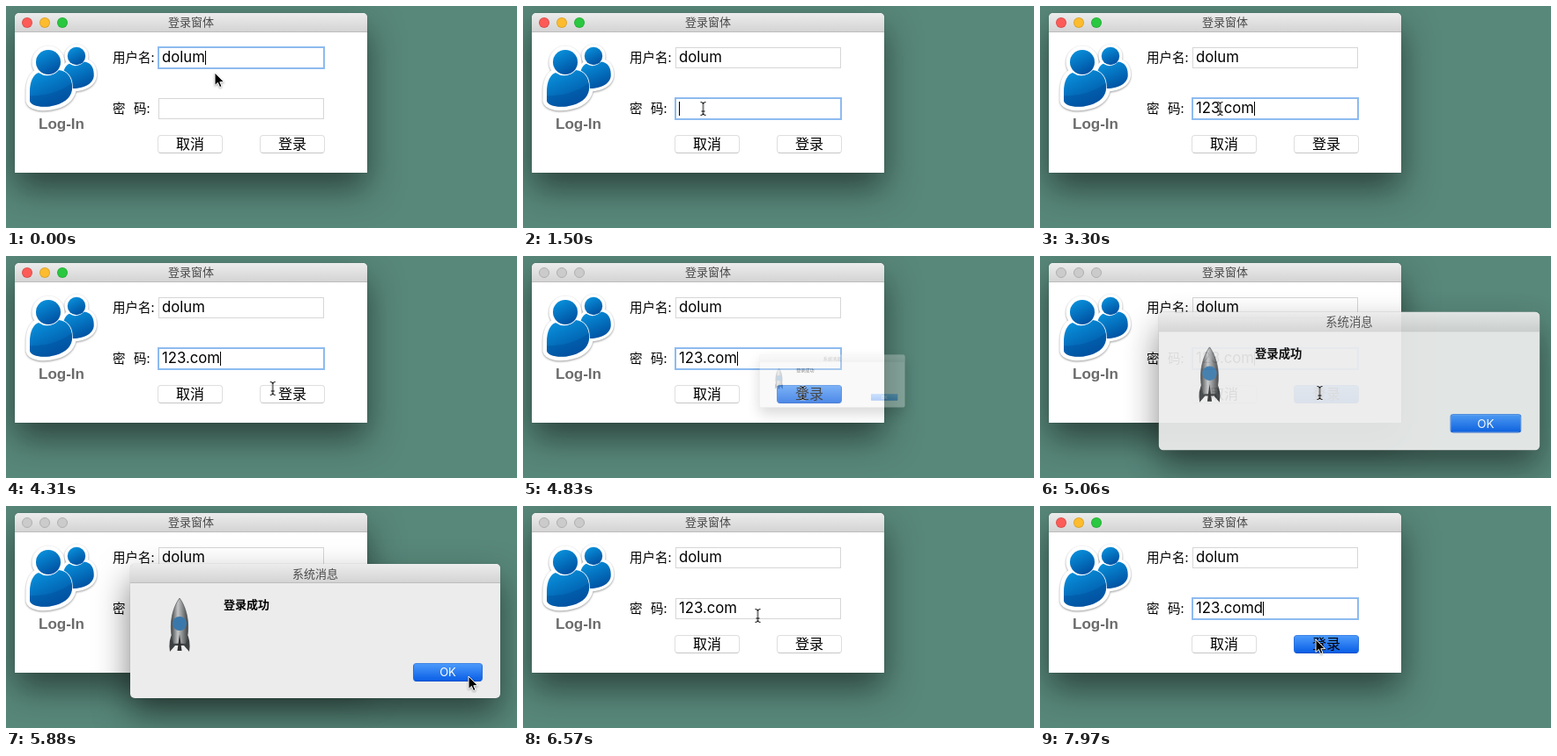
An HTML page that plays this animation: 580 px wide and 253 px high, repeating every 8 s.

```html
<!DOCTYPE html>
<html lang="zh-CN">
<head>
<meta charset="utf-8">
<title>登录窗体</title>
<style>
html, body { margin: 0; width: 100%; height: 100%; overflow: hidden; background: #58887a; }
body { position: relative; font-family: "Noto Sans CJK SC", "Noto Sans CJK", sans-serif; color: #000; }
body * { box-sizing: border-box; }
.at, .window, .bar, .field, .button, svg { position: absolute; }
.at { line-height: 20px; white-space: nowrap; }
svg { left: 0; top: 0; overflow: visible; }

.window { border-radius: 5px 5px 0 0; box-shadow: 0 18px 38px rgba(0, 0, 0, .5), 0 0 1px rgba(0, 0, 0, .35); }
.bar {
  left: 0; top: 0; width: 100%; height: 22px; border-radius: 5px 5px 0 0;
  background: linear-gradient(#ececec, #d4d4d4); border-bottom: 1px solid #bdbdbd;
  font-size: 13px; font-weight: 500; line-height: 20px; text-align: center; color: #4a4a4a;
}
#login { left: 10px; top: 8px; width: 400px; height: 182px; background: #fff; }
.light { position: absolute; top: 5px; width: 12px; height: 12px; border-radius: 50%; border: 1px solid rgba(0, 0, 0, .12); }
.inactive .light { background: #cbcbcb !important; border-color: #b0b0b0; }
.label { font-size: 14.5px; font-weight: 500; }
.caption { font: bold 17px/20px "Liberation Sans", sans-serif; color: #6b6b6b; }

.field {
  left: 163px; width: 188px; height: 24px; padding-left: 3px; border: 1px solid #d6d6d6;
  font: 16.7px/21px Inter, sans-serif; font-feature-settings: "cv11"; white-space: nowrap;
}
.field.focus { border-color: #8cb9ee; box-shadow: 0 0 0 1px #8fbcf0; }
.field i { display: inline-block; width: 1px; height: 16px; vertical-align: -3px; background: #000; visibility: hidden; }
.field.caret i { visibility: visible; }

.button {
  top: 139px; width: 74px; height: 21px; border: 1px solid #dedede; border-bottom-color: #c6c6c6;
  border-radius: 4px; background: #fff; font-size: 16px; line-height: 17px; text-align: center;
}
.button.blue { background: linear-gradient(#4c9afb, #0a5fe6); border-color: #3f86e6 #2a70dc #0a50cc; }

#alert {
  left: 141px; top: 66px; width: 420px; height: 153px; border-radius: 5px; background: #ececec;
  animation: pop 8s linear infinite;
}
#alert .bar { font-weight: 400; line-height: 21px; }
.message { font-size: 13px; font-weight: bold; }
#alert .button { left: 321px; top: 113px; width: 79px; color: #fff; font: 13px/18px Inter, sans-serif; }

#pointer { position: absolute; left: 0; top: 0; animation: move 8s ease-in-out infinite; }
#arrow { filter: drop-shadow(0 1px 1px rgba(0, 0, 0, .35)); }

@keyframes pop {
  0%, 58.6% { transform: scale(0); opacity: 0; }
  59.625% { transform: scale(.1); opacity: .15; }
  60.375% { transform: scale(.386); opacity: .3; }
  61.125% { transform: scale(.8); opacity: .45; }
  61.875% { transform: scale(1.163); opacity: .6; }
  62.625% { transform: scale(1.1); opacity: .8; }
  63.25% { transform: scale(1.03); opacity: .93; }
  64%, 74.2% { transform: none; opacity: 1; }
  74.21%, 100% { transform: none; opacity: 0; }
}
@keyframes move {
  0%, .7% { transform: translate(237px, 76px); }
  6.75%, 48.5% { transform: translate(204.5px, 117px); }
  55.7%, 67.6% { transform: translate(317.5px, 156px); }
  71.4%, 76.4% { transform: translate(525px, 194px); }
  82.1% { transform: translate(266.5px, 125px); }
  85%, 93% { transform: translate(264px, 121px); }
  98.9%, 100% { transform: translate(313px, 152px); }
}
</style>
</head>
<body>
<div id="login" class="window">
  <div class="bar">登录窗体
    <b class="light" style="left:8px;background:#fc5b57"></b>
    <b class="light" style="left:28px;background:#fdbc2e"></b>
    <b class="light" style="left:48px;background:#2ac840"></b>
  </div>
  <svg width="1" height="1">
    <defs>
      <linearGradient id="blue" x2=".5" y2="1"><stop stop-color="#0a98e2"/><stop offset="1" stop-color="#0054a4"/></linearGradient>
      <g id="person">
        <path d="M-21 34C-21 22-17 14-11 12Q0 20 12 9C22 10 27 18 27 28C28 38 20 46 8 49C-6 53-20 50-21 44Z"/>
        <circle r="14"/>
      </g>
      <g id="pair">
        <use href="#person" transform="translate(70 49) scale(.73)"/>
        <use href="#person" transform="translate(38 56)"/>
      </g>
    </defs>
    <use href="#pair" fill="#fff" stroke="#fff" stroke-width="9" stroke-linejoin="round" style="filter:drop-shadow(0 1px 1px rgba(0,0,0,.4))"/>
    <use href="#person" transform="translate(70 49) scale(.73)" fill="url(#blue)"/>
    <use href="#person" transform="translate(38 56)" fill="url(#blue)" stroke="#fff" stroke-width="1.500" paint-order="stroke"/>
    <path d="M17 94Q42 96 65 80C66 92 58 102 46 105C32 109 18 106 17 100Z" fill="#004f9c" opacity=".4"/>
  </svg>
  <div class="at caption" style="left:27px;top:117px">Log-In</div>
  <div class="at label" style="left:111px;top:40px">用户名:</div>
  <div class="at label" style="left:111px;top:98px">密</div>
  <div class="at label" style="left:135px;top:98px">码:</div>
  <div id="user" class="field" style="top:39px"><span>dolum</span><i></i></div>
  <div id="pass" class="field" style="top:97px"><span></span><i></i></div>
  <div class="button" style="left:162px">取消</div>
  <div id="submit" class="button" style="left:278px">登录</div>
</div>

<div id="alert" class="window">
  <div class="bar">系统消息</div>
  <svg width="1" height="1">
    <defs>
      <linearGradient id="steel"><stop stop-color="#3f4244"/><stop offset=".4" stop-color="#c4c6c7"/><stop offset="1" stop-color="#3f4244"/></linearGradient>
    </defs>
    <path d="M48 79Q43 87 45 100L51 93H61L67 100Q69 87 64 79Z" fill="#3c3f41"/>
    <path d="M56 39C64 50 69 69 63 91H49C43 69 48 50 56 39Z" fill="url(#steel)" stroke="#505355" stroke-width=".7"/>
    <path d="M56 80L58.500 99H53.500Z" fill="#2d2f31"/>
    <circle cx="56" cy="68" r="8" fill="#3a78ab"/>
  </svg>
  <div class="at message" style="left:106px;top:36px">登录成功</div>
  <div class="button blue">OK</div>
</div>

<div id="pointer">
  <svg id="arrow" width="1" height="1">
    <path d="M0 0V14.500L3.400 11.400 5.600 16.600 8 15.500 5.800 10.700H10.500Z" stroke="#fff"/>
  </svg>
  <svg id="beam" width="1" height="1" fill="none">
    <defs><path id="caretShape" d="M-3-7.500Q0-7.500 0-5.500Q0-7.500 3-7.500M0-6V6M-3 7.500Q0 7.500 0 5.500Q0 7.500 3 7.500M-2 3H2"/></defs>
    <use href="#caretShape" stroke="#fff" stroke-opacity=".6" stroke-width="2.500"/>
    <use href="#caretShape" stroke="#000"/>
  </svg>
</div>

<script>
const LOOP = 8000;
const PASSWORD = "123.comd";
const KEY_TIMES = [1920, 2100, 2280, 2580, 2820, 3000, 3180, 7330];
const $ = id => document.getElementById(id);
const passText = $("pass").firstChild;

// True while t lies in one of the [from, to) spans.
const during = (t, ...spans) => spans.some(([from, to]) => t >= from && t < to);

function render(t) {
  const toggle = (id, name, ...spans) => $(id).classList.toggle(name, during(t, ...spans));
  toggle("user", "focus", [0, 590]);
  toggle("user", "caret", [0, 590]);
  toggle("pass", "focus", [590, 5936], [6800, LOOP]);
  toggle("pass", "caret", [590, 1200], [1500, 5936], [6800, LOOP]);
  toggle("login", "inactive", [4710, 6800]);
  toggle("submit", "blue", [4560, 5936], [7940, LOOP]);

  const overText = during(t, [420, 5420], [6480, 7640]);
  $("beam").style.display = overText ? "" : "none";
  $("arrow").style.display = overText ? "none" : "";

  const typed = PASSWORD.slice(0, KEY_TIMES.filter(key => key <= t).length);
  if (passText.textContent !== typed) passText.textContent = typed;
}

let start;
function tick(now) {
  start ??= now;
  render((now - start) % LOOP);
  requestAnimationFrame(tick);
}
render(0);
requestAnimationFrame(tick);
</script>
</body>
</html>
```
